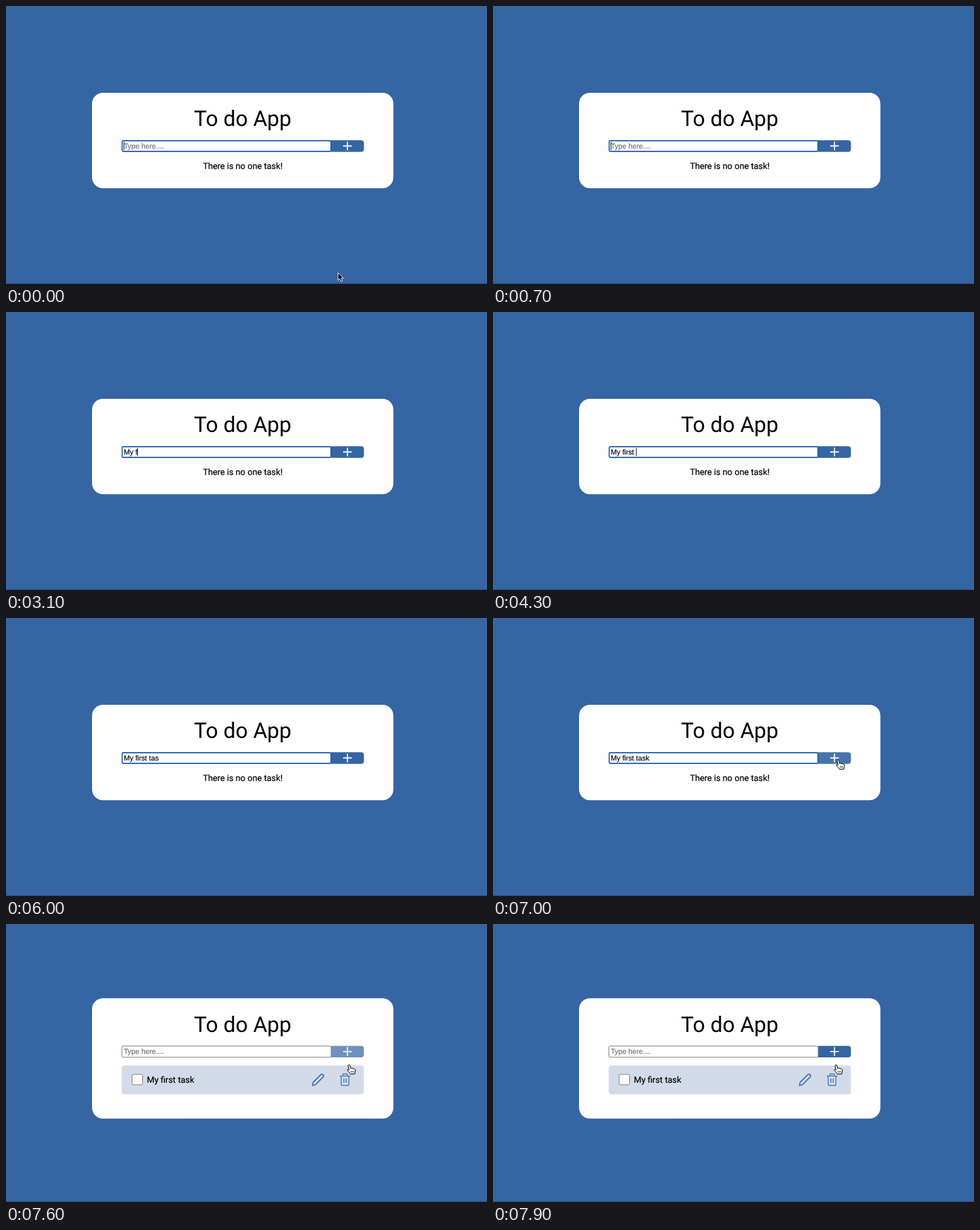
Write an HTML page that moves like this. It is 682 px wide and 394 px high and loops after 8 s.

```html
<!DOCTYPE html>
<html lang="en">
<head>
<meta charset="utf-8">
<title>To do App</title>
<style>
  html, body { margin: 0; height: 100%; overflow: hidden; background: #3565a3; }
  svg { display: block; width: 100%; height: 100%; }
  text { font: 12.25px Roboto, sans-serif; white-space: pre; text-rendering: geometricPrecision; }
  .small { stroke: #000; stroke-width: .2; }
  .title { font-size: 30.5px; }
  .mid { text-anchor: middle; }
  #field { font: 10.27px "Liberation Sans", Arial, sans-serif; stroke-width: .15; }
  .icon { fill: none; stroke-width: 1.5; stroke-linejoin: round; stroke-linecap: round; }
</style>
</head>
<body>
<svg viewBox="0 0 682 394">
  <rect width="682" height="394" fill="#3565a3"/>
  <rect y="393" width="682" height="1" fill="#2b4a74"/>
  <rect id="card" x="122" width="427.3" rx="15.4" fill="#fefefe"/>

  <g id="header">
    <text class="title mid" x="335.6" y="170.3">To do App</text>
    <path id="button" fill="#3565a3" d="M461 190.3h42.5a4 4 0 0 1 4 4v8.4a4 4 0 0 1-4 4H461z"/>
    <path d="M478 198.4h12.4M484.2 192.2v12.4" stroke="#fff" stroke-width="1.6"/>
    <rect id="box" fill="#fff"/>
    <text id="field" x="166.9" y="201.9"></text>
    <rect id="caret" y="192.6" width=".9" height="11.6"/>
  </g>

  <text id="empty" class="small mid" x="335.6" y="230.6">There is no one task!</text>

  <g id="task">
    <rect x="164" y="200.5" width="343.4" height="40.8" rx="4" fill="#d4dbe8"/>
    <rect x="178.9" y="213.1" width="14.8" height="14.8" rx="2" fill="#fff" stroke="#767676" stroke-width=".9"/>
    <text class="small" x="199.8" y="225.1">My first task</text>
    <path class="icon" stroke="#3b6bb0" d="M434.4 228.9l1.1-4.5 10.8-10.8a2.2 2.2 0 0 1 3.3 3.3l-10.8 10.8z"/>
    <path class="icon" stroke="#5580bf" d="M473.8 215.4h13.9M477.7 215.2v-2.6h6.1v2.6M475.3 215.6v11.3q0 1.8 1.8 1.8h7.3q1.8 0 1.8-1.8V215.6M479.1 219.4v5.2M482.4 219.4v5.2"/>
  </g>

  <path id="arrow" d="M0 0V10.4L2.5 8.1 4.3 12.2 6.2 11.4 4.5 7.4H7.8Z" stroke="#fff" stroke-width=".9"/>
  <g id="hand" fill="#fff" stroke="#000" stroke-linejoin="round">
    <path d="M-1.5 1.3C-1.5-.3 1-.3 1.2 1.2L2 5.2C3 4.2 4.4 4.6 4.6 5.6 5.6 4.8 6.8 5.3 7 6.3 8 5.7 9 6.5 9 7.6 9 9.5 8.5 11 7.8 13.2H1.8C.8 11-1 10-2.5 8-3 6.6-1.5 6.2-.2 7.6Z"/>
    <path d="M2.6 8.6l.4 2.6M4.5 8.6l.2 2.6M6.4 8.6v2.6" stroke-width=".7"/>
  </g>
</svg>

<script>
const LOOP = 8000, STEP = 100, FADE = 300;
const TASK = "My first task";
const KEY_TIMES = [2200, 2500, 2700, 3000, 3300, 3500, 3800, 4100, 4300, 5000, 5200, 5500, 6100];
const HOVER = 6900, PRESS = 7500, ADDED = 7600;
const MOVES = [
  { start: 0, end: 600, hide: 700, from: [470.8, 378.3], to: [371, 310] },
  { start: 6500, end: 7200, hide: LOOP, from: [523, 219], to: [486.5, 199.5] },
];

const el = id => document.getElementById(id);
const set = (id, attrs) => {
  for (const name in attrs) el(id).setAttribute(name, attrs[name]);
};
const show = (id, visible) => set(id, { visibility: visible ? "visible" : "hidden" });
const progress = (t, start, duration) => Math.max(0, Math.min(1, (t - start) / duration));

function drawField(t, added) {
  const typed = KEY_TIMES.filter(k => k <= t);
  const text = added ? "" : TASK.slice(0, typed.length);
  const color = text ? "#000" : "#6c6c6c";
  const field = el("field");
  field.textContent = text || "Type here....";
  set("field", { fill: color, stroke: color });

  const focused = t < PRESS;
  const line = focused ? 1.6 : 0.9;
  set("box", {
    x: 163.9 + line / 2, y: 190.1 + line / 2, rx: 1.6,
    width: 297.6 - line, height: 16.8 - line,
    stroke: focused ? "#1f5fb0" : "#767676", "stroke-width": line,
  });

  // The blink restarts with every key
  const lastKey = typed.length ? typed[typed.length - 1] : -400;
  show("caret", focused && Math.floor((t - lastKey) / 500) % 2 === 0);
  set("caret", { x: 166.8 + (text ? field.getComputedTextLength() : 0) });
}

function drawPointer(t) {
  const move = MOVES.find(m => t >= m.start && t < m.hide);
  const isHand = t >= HOVER;
  show("arrow", move && !isHand);
  show("hand", move && isHand);
  if (!move) return;
  const eased = 1 - (1 - progress(t, move.start, move.end - move.start)) ** 2;
  const [x, y] = move.from.map((v, i) => v + (move.to[i] - v) * eased);
  set(isHand ? "hand" : "arrow", { transform: `translate(${x} ${y})` });
}

function draw(t) {
  const added = t >= ADDED;
  set("card", { y: added ? 105.3 : 123, height: added ? 170.4 : 135.2 });
  set("header", { transform: `translate(0 ${added ? -17.6 : 0})` });
  show("empty", !added);
  show("task", added);
  // The button fades while hovered and recovers once it moves away
  const hover = progress(t, HOVER, FADE) - progress(t, ADDED, FADE);
  set("button", { opacity: 1 - 0.3 * hover });
  drawField(t, added);
  drawPointer(t);
}

const origin = performance.now();
function frame() {
  const t = (performance.now() - origin) % LOOP;
  draw(Math.floor(t / STEP) * STEP);
  requestAnimationFrame(frame);
}
frame();
</script>
</body>
</html>
```
